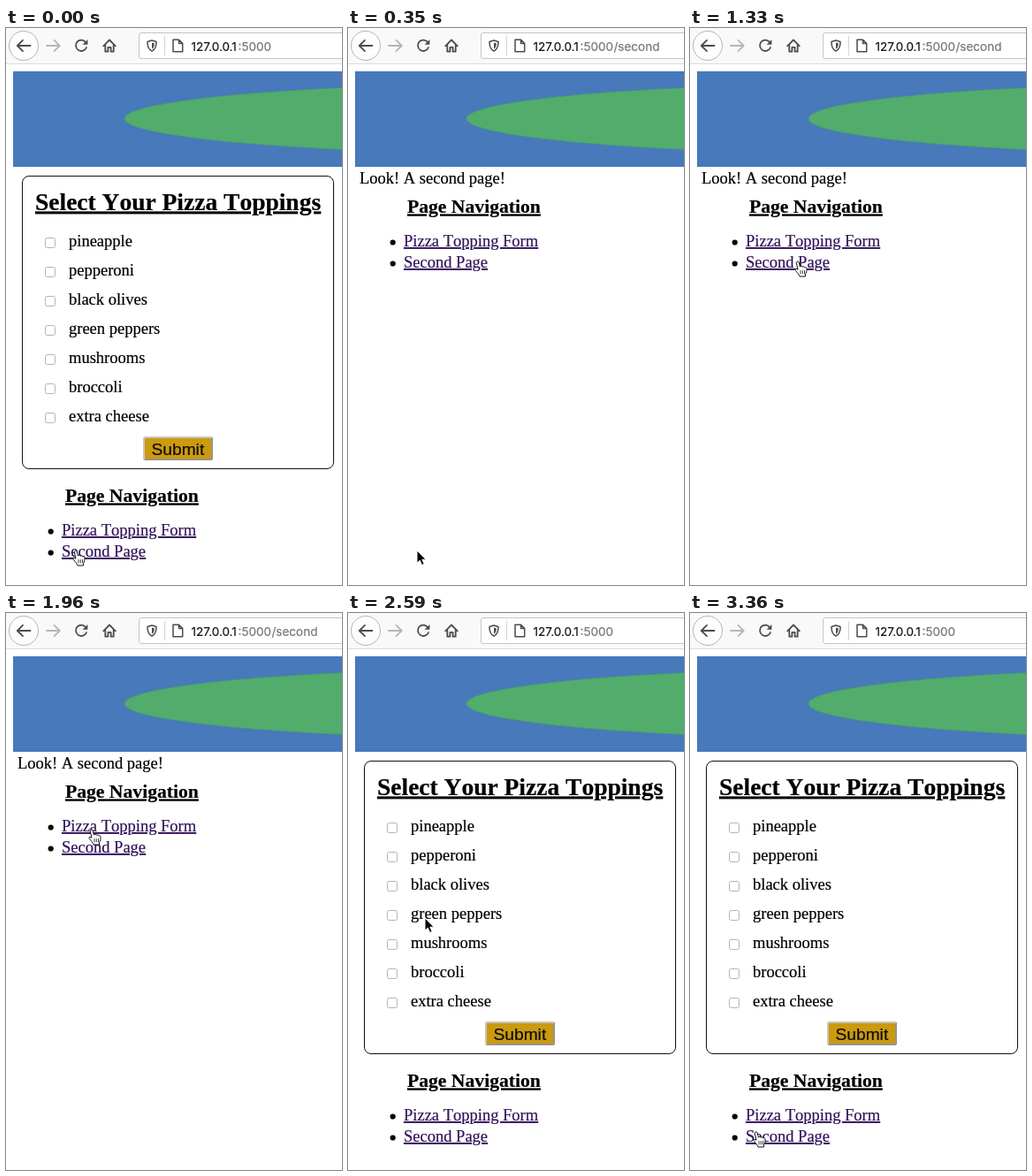
An HTML page for the animation above (3500 ms loop, 380 px wide and 630 px high).

```html
<!DOCTYPE html>
<html lang="en">
<head>
<meta charset="utf-8">
<title>Pizza topping form</title>
<style>
  html, body { margin: 0; width: 100%; height: 100%; overflow: hidden; background: #fff; }
  svg { display: block; width: 380px; height: 630px; }
  text { white-space: pre; font-kerning: none; color: #000; fill: currentColor; stroke: currentColor; stroke-width: .2; }
  .body { font: 18.5px "Liberation Serif", Times, serif; font-kerning: none; }
  .h1 { font: bold 27.5px "Liberation Serif", Times, serif; font-kerning: none; text-decoration: underline; }
  .h2 { font: bold 21.65px "Liberation Serif", Times, serif; font-kerning: none; text-decoration: underline; }
  .link { color: #32125a; text-decoration: underline; }
  .link.active { color: #ab0f1b; }
  .url { font: 13.5px Inter, "Liberation Sans", sans-serif; color: #75757a; }
  .url.host { color: #151518; }
  .button { font: 19.2px "Liberation Sans", Arial, sans-serif; color: #0c0c0c; }
  .icon { fill: none; stroke: #4b4b50; stroke-width: 1.8; stroke-linecap: round; stroke-linejoin: round; }
  .icon.thin { stroke-width: 1.5; }
  .box { fill: #fff; stroke: #b4b4b4; }
</style>
</head>
<body>
<svg viewBox="0 0 380 630">
  <rect width="380" height="630" fill="#fff"/>

  <!-- browser bar -->
  <rect width="380" height="40" fill="#f9f9fa"/>
  <rect y="40" width="380" height="1" fill="#dcdcde"/>
  <circle cx="20" cy="20" r="16.5" fill="#fdfdfd" stroke="#b5b5b8"/>
  <g class="icon">
    <path d="M27.5 20H13M19 13.8L12.8 20L19 26.2"/>
    <path stroke="#b6b6b9" d="M46 20H60.5M54.5 13.8L60.7 20L54.5 26.2"/>
    <path d="M90.3 16.2A6.2 6.2 0 1 0 91 22"/>
    <path d="M110.2 20.3L117 13.5L123.8 20.3M112.3 19V26.7H115.4V21.8H118.6V26.7H121.7V19"/>
  </g>
  <path d="M92.4 13V18.8H86.6Z" fill="#4b4b50"/>
  <rect x="150.5" y="5.5" width="240" height="29" rx="2.5" fill="#fff" stroke="#c6c6c9"/>
  <g class="icon thin">
    <path d="M165 14L170 15.5C170.2 21 168.6 24.2 165 26.2C161.400 24.2 159.8 21 160 15.5Z"/>
    <path d="M189 13.2H195.500L199.700 17.400V26.8H189ZM195.500 13.500V17.400H199.400"/>
  </g>
  <path d="M165 16.500L167.800 17.300C167.700 20.500 167 22.500 165 23.800Z" fill="#4b4b50"/>
  <rect x="179" y="9" width="1" height="22" fill="#d3d3d6"/>
  <text class="url host" x="209.5" y="25.5">127.0.0.1</text>
  <text class="url" x="262.5" y="25.5">:5000</text>
  <text class="url" id="path" x="300.5" y="25.5">/second</text>

  <!-- banner -->
  <rect x="8" y="49" width="372" height="108" fill="#4779bb"/>
  <ellipse cx="629" cy="102.5" rx="495" ry="40.5" fill="#52ac6c" stroke="#47937f" stroke-width=".8"/>

  <g id="form">
    <rect x="18.5" y="167.5" width="352" height="331" rx="7.5" fill="#fff" stroke="#111"/>
    <text class="h1" x="33" y="205.5">Select Your Pizza Toppings</text>
    <g id="toppings"></g>
    <rect x="155" y="462" width="79" height="27" rx="2.5" fill="#c9c5bb"/>
    <path d="M234 463V486.500Q234 489 231.500 489H156L157.500 487H232V464Z" fill="#96938c"/>
    <rect x="157" y="464" width="75" height="23" rx="1" fill="#cb9a0f"/>
    <text class="button" x="164.5" y="483">Submit</text>
  </g>

  <text class="body" id="look" x="13" y="176">Look! A second page!</text>

  <g id="nav">
    <text class="h2" x="67" y="535.500">Page Navigation</text>
    <circle cx="50.700" cy="569.500" r="3.100"/>
    <circle cx="50.700" cy="593.500" r="3.100"/>
    <text class="body link" id="formLink" x="63" y="574">Pizza Topping Form</text>
    <text class="body link" id="secondLink" x="63" y="598">Second Page</text>
  </g>

  <g id="cursor">
    <path id="arrow" stroke="#fff" stroke-width="1" stroke-linejoin="round"
      d="M0 0V14.2L3.3 11.2L5.6 16.5L8.2 15.4L5.9 10.2H10.3Z"/>
    <g id="hand" transform="translate(0 -1)" fill="#fff" stroke="#111" stroke-linejoin="round" stroke-linecap="round">
      <path d="M-1.7 1C-1.2 -.6 .9 -.4 1.2 1L2.4 6C3 4.8 5 5 5.2 6.3C6 5.4 7.6 5.8 7.8 7C8.8 6.4 10 7 10 8.2C10.2 11 9.5 13 8.5 14.5V17H2C1.5 15 -.5 13 -2.5 10.5C-4 8.6 -2.5 7.5 -.3 9Z"/>
      <path d="M3 10.5V14M5.3 10.5V14M7.5 10.5V14" stroke-width=".8"/>
    </g>
  </g>
</svg>
<script>
  const LOOP = 3500, STEP = 70;
  const $ = id => document.getElementById(id);
  const show = (id, on) => $(id).style.display = on ? "" : "none";
  const within = (t, from, to) => t >= from && t < to;

  const toppings = ["pineapple", "pepperoni", "black olives", "green peppers",
                    "mushrooms", "broccoli", "extra cheese"];
  $("toppings").innerHTML = toppings.map((name, i) => {
    const y = 33 * i;
    return `<rect class="box" x="44.5" y="${237.5 + y}" width="11" height="11" rx="2"/>
            <text class="body" x="71" y="${247 + y}">${name}</text>`;
  }).join("");

  // pointer path: time, x, y
  const path = [
    [0, 79, 592], [280, 78, 591], [840, 78, 591], [910, 85, 574],
    [980, 92, 535], [1120, 107, 415], [1260, 118, 300], [1330, 122, 265],
    [1400, 122, 250], [1680, 97, 246], [1960, 97, 246], [2170, 96, 244],
    [2380, 96, 244], [2450, 95, 256], [2590, 87, 345], [2730, 75, 460],
    [2870, 66, 527], [2940, 65, 537], [3080, 66, 562], [3220, 71, 582],
    [3360, 75, 588], [LOOP, 75, 588]
  ];

  function pointAt(t) {
    const i = path.findIndex(p => p[0] > t);
    const [t0, x0, y0] = path[i - 1], [t1, x1, y1] = path[i];
    const k = (t - t0) / (t1 - t0);
    return [x0 + (x1 - x0) * k, y0 + (y1 - y0) * k].map(Math.round);
  }

  function draw(now) {
    const t = Math.floor((now % LOOP) / STEP) * STEP;
    const second = within(t, 350, 2100);
    show("form", !second);
    show("look", second);
    show("path", second);
    $("nav").setAttribute("transform", `translate(0 ${second ? -327 : 0})`);
    $("secondLink").classList.toggle("active", within(t, 210, 350));
    $("formLink").classList.toggle("active", within(t, 2030, 2100));

    const hand = t < 280 || within(t, 1330, 2100) || t >= 3080;
    show("hand", hand);
    show("arrow", !hand);
    $("cursor").setAttribute("transform", `translate(${pointAt(t)})`);
  }

  const start = performance.now();
  function tick() {
    draw(performance.now() - start);
    requestAnimationFrame(tick);
  }
  tick();
</script>
</body>
</html>
```
